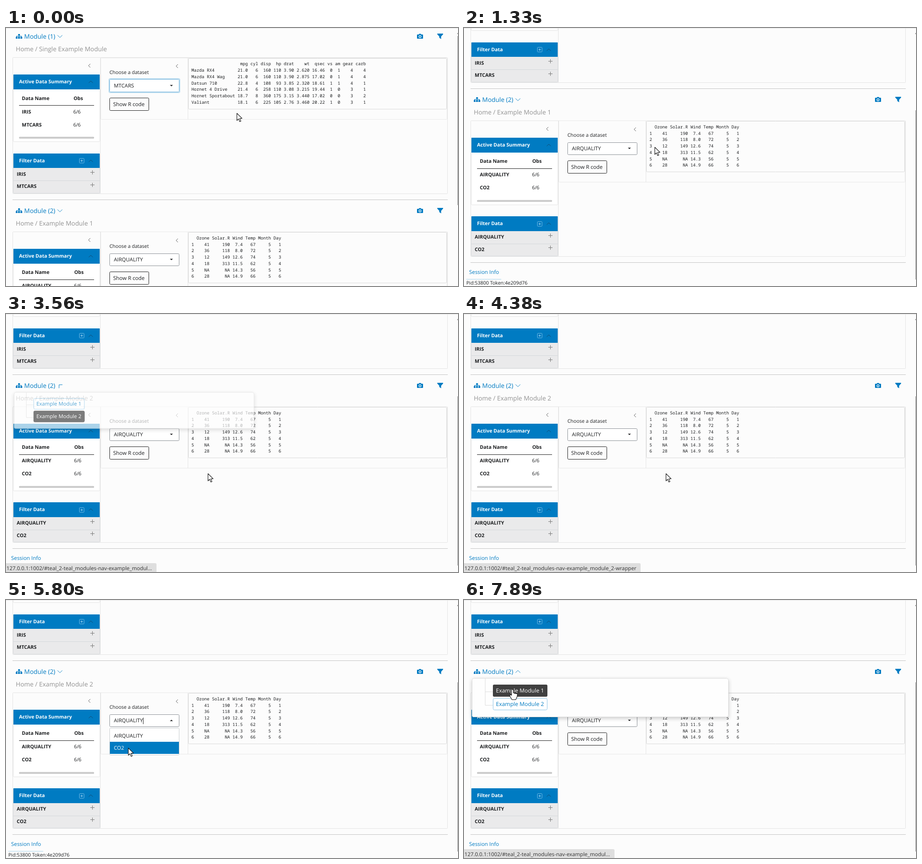
Write an HTML page with a canvas that moves like this. It is 970 by 555 pixels and loops after 8000 ms.

```html
<!DOCTYPE html>
<html lang="en">
<head>
<meta charset="utf-8">
<title>Module dashboard</title>
<style>
html, body { margin: 0; width: 100%; height: 100%; overflow: hidden; background: #fcfcfc; }
canvas { display: block; width: 970px; height: 555px; }
</style>
</head>
<body>
<canvas id="stage" width="970" height="555"></canvas>
<script>
const W = 970, H = 555, LOOP = 8000;
const BLUE = '#007bc2', INK = '#1d1f21', EDGE = '#e4e4e4', PAGE = '#fcfcfc';
const SANS = '"Open Sans", sans-serif', MONO = '"Noto Sans Mono", monospace';
const MODULE_GAP = 374.5, SCROLL_END = 239;

const screen2d = document.getElementById('stage').getContext('2d');
const layer2d = new OffscreenCanvas(W, H).getContext('2d');
screen2d.textRendering = layer2d.textRendering = 'geometricPrecision';
let ctx = screen2d;

// Moments at which something is clicked, hovered or shown
const AT = { blur: 440, open: 1760, hover: 2780, choose: 3250, shut: 3560, widen: 3840,
  list: 5100, option: 5530, pick: 5940, reopen: 7190, rehover: 7470, swap: 7750 };
const STEP = 145;

// Pointer stops: arrival, place and the shape it takes there
const TRAVEL = 300;
const STOPS = [
  [0, 495, 183, 'arrow'],
  [590, 409, 256, 'arrow'],
  [AT.open, 112, 158, 'hand'],
  [2340, 207, 221, 'arrow'],
  [AT.hover, 135, 226, 'hand'],
  [AT.shut, 433, 343, 'arrow'],
  [AT.list, 311, 261, 'beam'],
  [AT.option, 262, 318, 'arrow'],
  [6800, 130, 169, 'arrow'],
  [AT.reopen, 112, 157, 'hand'],
  [AT.rehover, 104, 193, 'hand']
];

// Right-aligns every cell under the end of its heading
function table(head, names, rows) {
  const ends = [...head.matchAll(/\S+/g)].map(w => w.index + w[0].length);
  return [head, ...rows.map((row, i) =>
    row.split(' ').reduce((s, cell, k) => s + cell.padStart(ends[k] - s.length), names[i]))];
}
const ROW_IDS = [...'123456'];
const TABLES = {
  MTCARS: table(' '.repeat(19) + 'mpg cyl disp  hp drat    wt  qsec vs am gear carb',
    ['Mazda RX4', 'Mazda RX4 Wag', 'Datsun 710', 'Hornet 4 Drive', 'Hornet Sportabout', 'Valiant'],
    ['21.0 6 160 110 3.90 2.620 16.46 0 1 4 4', '21.0 6 160 110 3.90 2.875 17.02 0 1 4 4',
      '22.8 4 108 93 3.85 2.320 18.61 1 1 4 1', '21.4 6 258 110 3.08 3.215 19.44 1 0 3 1',
      '18.7 8 360 175 3.15 3.440 17.02 0 0 3 2', '18.1 6 225 105 2.76 3.460 20.22 1 0 3 1']),
  AIRQUALITY: table('  Ozone Solar.R Wind Temp Month Day', ROW_IDS,
    ['41 190 7.4 67', '36 118 8.0 72', '12 149 12.6 74', '18 313 11.5 62', 'NA NA 14.3 56',
      '28 NA 14.9 66'].map((row, i) => `${row} 5 ${i + 1}`)),
  CO2: table('  Plant   Type  Treatment conc uptake', ROW_IDS,
    ['95 16.0', '175 30.4', '250 34.8', '350 37.2', '500 35.3', '675 39.2']
      .map(row => 'Qn1 Quebec nonchilled ' + row))
};

const clamp = (v, lo, hi) => Math.min(hi, Math.max(lo, v));

// Moves a height to the nearest whole screen row
function snap(y) {
  const top = ctx.getTransform().f;
  return Math.round(y + top) - top;
}
function fill(x, y, w, h, color) {
  const y0 = snap(y);
  ctx.fillStyle = color;
  ctx.fillRect(x, y0, w, snap(y + h) - y0);
}
function box(x, y, w, h, r, bg, edge) {
  const y0 = snap(y), h0 = snap(y + h) - y0;
  if (bg) {
    ctx.beginPath();
    ctx.roundRect(x, y0, w, h0, r);
    ctx.fillStyle = bg;
    ctx.fill();
  }
  if (edge) {
    ctx.beginPath();
    ctx.roundRect(x + .5, y0 + .5, w - 1, h0 - 1, r);
    ctx.strokeStyle = edge;
    ctx.lineWidth = 1;
    ctx.stroke();
  }
}
// Text placed by its left end and the middle of its capitals
function text(s, x, y, size, color = INK, weight = 400, family = SANS) {
  ctx.font = `${weight} ${size}px ${family}`;
  ctx.fillStyle = color;
  ctx.fillText(s, x, snap(y + size * .36));
}
const bold = (s, x, y, color) => text(s, x, y, 10.5, color, 700);
function line(points, color, width = 1) {
  ctx.beginPath();
  points.forEach(p => ctx.lineTo(...p));
  ctx.strokeStyle = color;
  ctx.lineWidth = width;
  ctx.stroke();
}
function shape(points, color) {
  ctx.beginPath();
  points.forEach(p => ctx.lineTo(...p));
  ctx.closePath();
  ctx.fillStyle = color;
  ctx.fill();
}
function chevron(x, y, w, h, turn, color) {
  ctx.save();
  ctx.translate(x, snap(y));
  ctx.rotate(turn * Math.PI);
  line([[-w, -h], [0, h], [w, -h]], color, .9);
  ctx.restore();
}
function plus(x, y, r, color) {
  fill(x - r, y - .5, 2 * r, 1, color);
  fill(x - .5, y - r, 1, 2 * r, color);
}

function sitemap() {
  fill(26, 13, 4, 3, BLUE);
  fill(27.4, 16, 1.2, 3, BLUE);
  fill(22.3, 17, 11.2, 1, BLUE);
  for (const x of [21, 26, 31]) {
    fill(x + 1.3, 17, 1.2, 2, BLUE);
    fill(x, 19, 3.8, 4, BLUE);
  }
}
function camera() {
  shape([[885.5, 14.5], [886.5, 12.6], [890.5, 12.6], [891.5, 14.5]], BLUE);
  box(882, 14, 13, 9, 1, BLUE);
  ctx.beginPath();
  ctx.arc(888.5, 18.4, 2.3, 0, 7);
  ctx.strokeStyle = '#fff';
  ctx.lineWidth = 1.2;
  ctx.stroke();
}
function funnel() {
  shape([[925.5, 12], [938, 12], [938, 13.5], [933.8, 18.2], [933.8, 23.8],
    [929.8, 21], [929.8, 18.2], [925.5, 13.5]], BLUE);
}

function heading(m) {
  ctx.save();
  ctx.translate(0, snap(0));
  sitemap();
  text(m.title, 39, 18, 13.44, BLUE);
  chevron(115.7, 18, 5.2, 2.5, m.open, BLUE);
  camera();
  funnel();
  text('Home / ' + m.crumb, 21, 45, 13.44, '#929292');
  ctx.restore();
}

function bar(label, y, h) {
  fill(16, y, 185, h, BLUE);
  bold(label, 28, y + 15.5, '#fff');
  chevron(182, y + 16, 4.5, 2, 1, '#12486d');
}
function sidebar(m) {
  chevron(179, 81, 4, 2, .5, '#555');
  box(15, 100, 187, 145, 2, '#fff', EDGE);
  bar('Active Data Summary', 100, 32.3);
  bold('Data Name', 34, 151);
  bold('Obs', m.obsX, 151);
  fill(28, 166, 161, 1, '#222');
  box(28, 234, 161, 4, 2, '#cfcfcf', '#c6c6c6');

  box(15, 269.5, 187, 86, 2, '#eaeaeb', '#d9dcdf');
  fill(16, 328, 185, 1, '#d5d8db');
  bar('Filter Data', 269.5, 31.9);
  box(157, 280, 11, 11, 1, null, '#6db8e4');
  plus(162.5, 285.5, 2.5, '#9bd0ef');
  m.sets.forEach((name, i) => {
    bold(name, 34, 180 + 28 * i);
    text('6/6', m.obsX - .5, 180 + 28 * i, 10.5);
    bold(name, 23, 314 + 26.6 * i);
    plus(185.5, 310.5 + 26.5 * i, 4.5, '#777');
  });
}

function form(m) {
  chevron(367, 82, 4, 2, .5, '#555');
  text('Choose a dataset', 222, 95, 10.5);
  if (m.focus) box(220, 108, 154, 31.5, 4, '#bfdef0');
  box(222, 110, 150, 27.5, 2, '#fff', m.focus ? '#73b3db' : '#8d9298');
  text(m.data, 231.5, 123.8, 11.2);
  const caret = snap(123.8), d = m.list ? -1.6 : 1.6;
  shape([[351.8, caret - d], [358.2, caret - d], [355, caret + d]], INK);
  if (m.list) fill(294, 117, 1, 14, '#222');
  if (m.list === 'opening') {
    box(222, 139, 150, 15, 2, '#f7f8f8');
    fill(222, 147, 150, 6, '#e7e9eb');
  }
  box(222, 149.9, 85, 27.7, 2, m.list ? null : PAGE, '#222');
  text('Show R code', 230, 163.4, 11.4);
  if (m.list === 'open') optionList(m.option);
}

function optionList(hover) {
  box(222, 139, 150, 59, 2, '#fff', '#c9cdd1');
  ['AIRQUALITY', 'CO2'].forEach((name, i) => {
    const on = hover === i;
    if (on) fill(223, 143 + 26 * i, 148, 26, BLUE);
    text(name, 231.5, 156 + 26 * i, 11.2, on ? '#fff' : INK);
  });
}

function moduleView(m) {
  ctx.save();
  ctx.translate(0, m.top);
  heading(m);
  box(14, 63, 934, 293.5, 1, null, EDGE);
  fill(202, 63, 1, 293, EDGE);
  box(203, 63.5, 744, 133, 1, null, '#e9e9e9');
  fill(390, 64, 1, 132, EDGE);
  sidebar(m);
  form(m);
  box(391, 64.5, 555, 110, 2, PAGE, '#dadada');
  TABLES[m.data].forEach((row, i) => text(row, 398, 77 + 13.75 * i, 9.19, INK, 500, MONO));
  fill(14, 368.9, 934, 1, '#c4c4c4');
  ctx.restore();
}

// Drawn on its own layer so that it fades as one piece
function menu(open, active) {
  if (!open) return;
  ctx = layer2d;
  ctx.clearRect(0, 0, W, H);
  ctx.save();
  ctx.translate(17, 168);
  const k = .744 + .256 * open;
  ctx.scale(k, k);
  ctx.shadowColor = 'rgba(0,0,0,.2)';
  ctx.shadowBlur = 8;
  ctx.shadowOffsetY = 3;
  box(0, 0, 551, 84, 4, '#fefefe');
  ctx.shadowColor = 'transparent';
  box(0, 0, 551, 84, 4, null, '#dcdcdc');
  line([[28.5, 1], [28.5, 58.5], [45, 58.5]], '#ddd');
  line([[28.5, 29.5], [45, 29.5]], '#ddd');
  for (const n of [1, 2]) {
    const y = 14 + 29 * (n - 1), on = n === active;
    box(45, y, 117, 26, 3, on ? '#404040' : '#fff', on ? '#404040' : '#8dc5e6');
    text('Example Module ' + n, 51.5, y + 13, 11.95, on ? '#fff' : BLUE);
  }
  ctx.restore();
  ctx = screen2d;
  ctx.globalAlpha = open < 1 ? open * .9 : 1;
  ctx.drawImage(layer2d.canvas, 0, 0);
  ctx.globalAlpha = 1;
}

function statusBar(width, tail) {
  box(0, 536, width, 19, [0, 3, 0, 0], '#dedede');
  text('127.0.0.1:1002/#teal_2-teal_modules-nav-example_modul' + tail, 1, 546.5, 11.3, '#333');
}

function beam() {
  for (const s of [-1, 1])
    line([[-3, 7.5 * s], [-.5, 7.5 * s], [0, 6.5 * s], [.5, 7.5 * s], [3, 7.5 * s]], '#000');
  line([[0, -7], [0, 7]], '#000', 1.3);
}
function hand() {
  ctx.moveTo(-2, 12);
  ctx.lineTo(-2, 1);
  ctx.quadraticCurveTo(0, -2, 2, 1);
  ctx.lineTo(2, 7);
  for (const x of [2, 5, 8]) ctx.quadraticCurveTo(x + 1.5, 5 + x / 5, x + 2.6, 8 + x / 5);
  for (const p of [[10, 15], [7, 21.5], [-1, 21.5], [-6, 13]]) ctx.lineTo(...p);
  ctx.quadraticCurveTo(-6, 9.5, -2, 12);
}
function arrow() {
  [[.5, .5], [.5, 16], [4, 12.6], [6.6, 18.5], [9, 17.4], [6.5, 11.8], [11.5, 11.4]]
    .forEach(p => ctx.lineTo(...p));
}
function pointer(t) {
  const i = STOPS.findLastIndex(s => s[0] <= t);
  const [, x, y, kind] = STOPS[i];
  const [arrive, nx, ny] = STOPS[i + 1] || [LOOP + TRAVEL, x, y];
  const u = clamp((t - arrive) / TRAVEL + 1, 0, 1), e = u * u * (3 - 2 * u);
  ctx.save();
  ctx.translate(x + (nx - x) * e, y + (ny - y) * e);
  if (kind === 'beam') beam();
  else {
    ctx.beginPath();
    (kind === 'hand' ? hand : arrow)();
    ctx.closePath();
    ctx.fillStyle = '#fff';
    ctx.fill();
    ctx.strokeStyle = '#111';
    ctx.lineWidth = 1.1;
    ctx.lineJoin = 'round';
    ctx.stroke();
  }
  ctx.restore();
}

// The menu is part way open for one step after opening and while closing
function menuState(t) {
  const start = t < AT.reopen ? AT.open : AT.reopen;
  const end = t < AT.reopen ? AT.shut : LOOP;
  if (t < start || t >= end + STEP) return 0;
  return t < start + STEP || t >= end ? .75 : 1;
}

function draw(t) {
  const within = (a, b) => t >= a && t < b;
  const notch = clamp(Math.floor((t - 580) / 150), 0, 3);
  const scroll = Math.round(SCROLL_END * (notch / 3) ** 2.09);
  const open = menuState(t);
  const active = within(AT.choose, AT.swap) ? 2 : 1;
  const list = within(AT.list, AT.pick) && (t < AT.list + STEP ? 'opening' : 'open');

  fill(0, 0, W, H, PAGE);
  moduleView({ top: -scroll, title: 'Module (1)', crumb: 'Single Example Module', open: 0,
    sets: ['IRIS', 'MTCARS'], obsX: 145, data: 'MTCARS', focus: t < AT.blur });
  moduleView({ top: MODULE_GAP - scroll, title: 'Module (2)', crumb: 'Example Module ' + active,
    sets: ['AIRQUALITY', 'CO2'], obsX: 146.5, open, list, option: t < AT.option ? 0 : 1,
    data: within(AT.pick, AT.swap) ? 'CO2' : 'AIRQUALITY', focus: within(AT.pick, AT.reopen) });

  text('Session Info', 11, 764 - scroll, 11.4, BLUE);
  fill(5, 779 - scroll, 75, 1, '#a9d3ea');
  text('Pid:53800 Token:4e209d76', 5, 787 - scroll, 10.5);

  fill(0, 0, W, 1, '#e6e6e6');
  shape([[968, 13], [970, 10], [970, 13]], '#777');
  fill(969, 17 + scroll * .67, 1, 364, '#858585');
  menu(open, active);
  if (within(AT.hover, AT.widen) || t >= AT.rehover) statusBar(323, '...');
  else if (within(AT.widen, AT.list + 2 * STEP)) statusBar(379, 'e_2-wrapper');
  pointer(t);
}

function frame() {
  draw(performance.now() % LOOP);
  requestAnimationFrame(frame);
}
frame();
</script>
</body>
</html>
```
